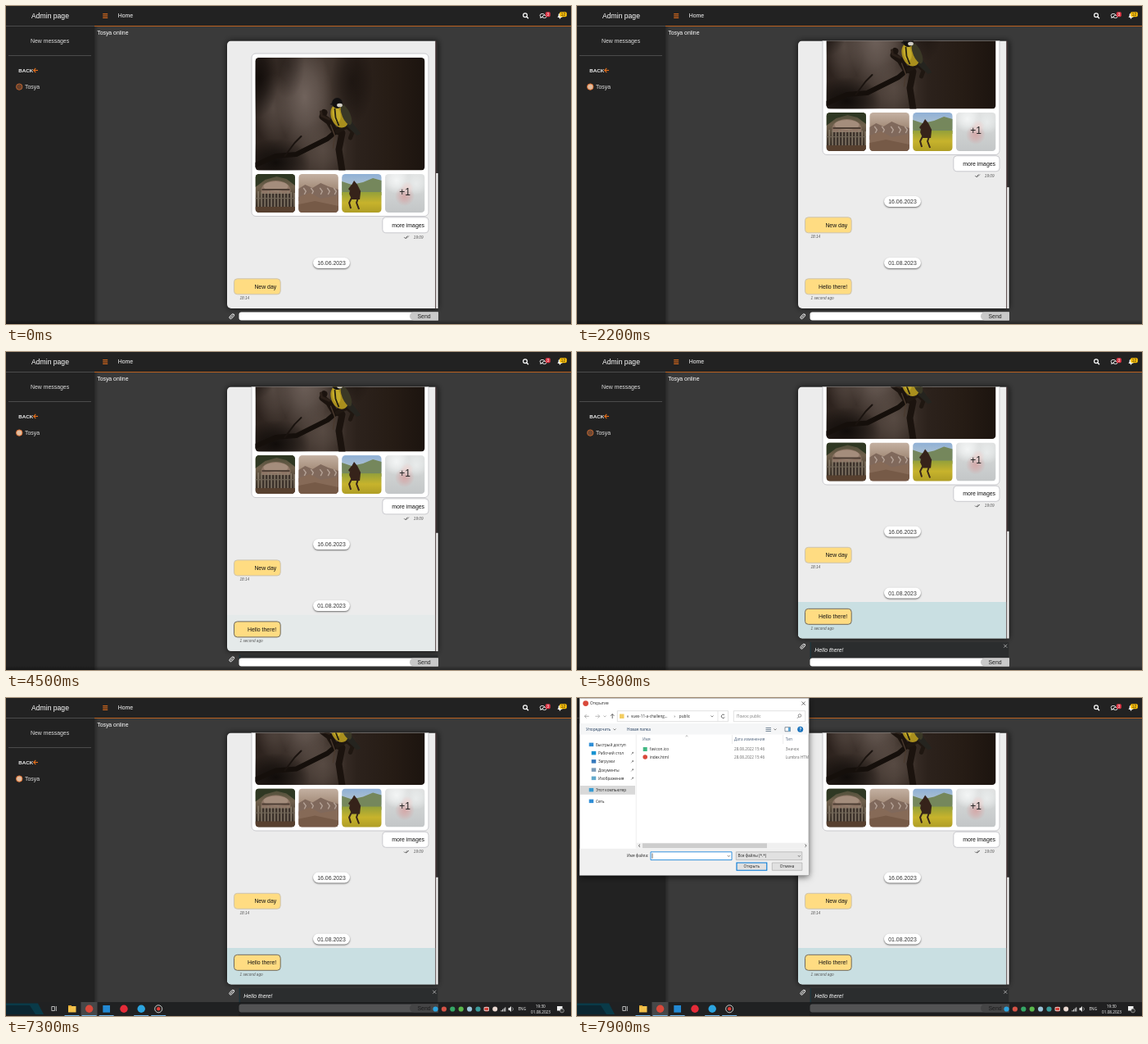
Animation, 690 px wide and 388 px high, one loop 8 s. Source, as an HTML page with a canvas:

```html
<!DOCTYPE html>
<html lang="en">
<head>
<meta charset="utf-8">
<title>Admin chat</title>
<style>
html, body { margin: 0; width: 100%; height: 100%; overflow: hidden; background: #3a3a3a; }
canvas { display: block; }
</style>
</head>
<body>
<canvas id="stage" width="690" height="388"></canvas>
<script>
const ctx = document.getElementById('stage').getContext('2d');
const LOOP = 8000;
const SANS = '"Liberation Sans", Arial, sans-serif';
const UI = '"Open Sans", "Noto Sans", sans-serif';
const USER = 'Tosya';
const ORANGE = '#e8701c';
const TOP = 42.5;
const ARRIVE = 1490;

const clamp = v => Math.max(0, Math.min(1, v));
const span = (t, a, b) => clamp((t - a) / (b - a));
const ease = p => p * p * (3 - 2 * p);

function rect(x, y, w, h, fill) {
  ctx.fillStyle = fill;
  ctx.fillRect(x, y, w, h);
}
function paint(fill, stroke, lw = 1) {
  if (fill) { ctx.fillStyle = fill; ctx.fill(); }
  if (stroke) { ctx.strokeStyle = stroke; ctx.lineWidth = lw; ctx.stroke(); }
}
function round(x, y, w, h, r, fill, stroke, lw) {
  ctx.beginPath();
  ctx.roundRect(x, y, w, h, r);
  paint(fill, stroke, lw);
}
function oval(x, y, rx, ry, fill, stroke, lw, turn = 0) {
  ctx.beginPath();
  ctx.ellipse(x, y, rx, ry, turn, 0, Math.PI * 2);
  paint(fill, stroke, lw);
}
const dot = (x, y, r, fill, stroke, lw) => oval(x, y, r, r, fill, stroke, lw);
function line(pts, stroke, lw = 1) {
  ctx.beginPath();
  for (let i = 0; i < pts.length; i += 2) ctx.lineTo(pts[i], pts[i + 1]);
  paint(null, stroke, lw);
}
function poly(pts, fill) {
  ctx.beginPath();
  for (let i = 0; i < pts.length; i += 2) ctx.lineTo(pts[i], pts[i + 1]);
  ctx.closePath();
  paint(fill);
}
function text(s, x, y, fill = '#fff', size = 6.9, align = 'left', style = '', family = SANS) {
  ctx.font = `${style} ${size}px ${family}`;
  ctx.textAlign = align;
  ctx.fillStyle = fill;
  ctx.fillText(s, x, y);
}
const ui = (s, x, y, fill = '#222', align = 'left') => text(s, x, y, fill, 4.7, align, '', UI);
function shade(x0, y0, x1, y1, ...colors) {
  const g = ctx.createLinearGradient(x0, y0, x1, y1);
  colors.forEach((c, i) => g.addColorStop(i / (colors.length - 1), c));
  return g;
}
function glow(x, y, r, rgb, alpha, sy = 1) {
  ctx.save();
  ctx.translate(x, y);
  ctx.scale(1, sy);
  const g = ctx.createRadialGradient(0, 0, 0, 0, 0, r);
  g.addColorStop(0, `rgba(${rgb},${alpha})`);
  g.addColorStop(.5, `rgba(${rgb},${alpha * .6})`);
  g.addColorStop(1, `rgba(${rgb},0)`);
  rect(-r, -r, 2 * r, 2 * r, g);
  ctx.restore();
}
function shadow(blur, color, draw, dy = 0) {
  ctx.save();
  ctx.shadowBlur = blur;
  ctx.shadowColor = color;
  ctx.shadowOffsetY = dy;
  draw();
  ctx.restore();
}
// Draws inside a rounded clip with its own origin
function photo(x, y, w, h, draw) {
  ctx.save();
  ctx.beginPath();
  ctx.roundRect(x, y, w, h, 4.5);
  ctx.clip();
  ctx.translate(x, y);
  draw(w, h);
  ctx.restore();
}

function bird(w, h) {
  rect(0, 0, w, h, shade(0, 0, w, 0, '#2b211c', '#3d322c', '#463a33', '#2c221c', '#261c15', '#1c140f'));
  glow(60, 48, 34, '128,114,107', .75, 1.9);
  glow(22, 62, 24, '104,91,84', .6, 1.8);
  glow(82, 112, 30, '104,90,82', .5);
  glow(4, 25, 24, '12,8,6', .8, 2);
  glow(118, 30, 26, '18,12,9', .6, 2);
  glow(25, 128, 42, '10,7,5', .85, .7);
  glow(40, 10, 20, '22,16,13', .4, 2);
  ctx.lineJoin = ctx.lineCap = 'round';
  line([0, 131, 25, 120, 50, 118, 72, 107, 88, 99, 101, 88], '#150f0b', 6);
  line([36, 120, 48, 104, 56, 96], '#1a130f', 2);
  line([84, 67, 82, 72, 90, 78, 96, 88, 106, 92, 102, 112, 106, 138], '#1b130e', 8);
  line([100, 90, 112, 84, 119, 90, 116, 98], '#1f1711', 5);
  line([80, 66, 81, 71, 90, 75], '#2b2019', 3);
  line([92, 82, 97, 95, 95, 110], '#4a3a2e', 1.3);
  ctx.lineJoin = ctx.lineCap = 'butt';
  poly([112, 68, 119, 80, 129, 93, 124, 95, 110, 82], '#25241f');
  oval(103, 71, 10.5, 15, '#a98f1d', null, 0, -.35);
  oval(99, 69, 5, 10, '#c3aa2a', null, 0, -.2);
  oval(111, 70, 5, 13, '#3a3826', null, 0, -.4);
  line([97, 62, 98, 73, 102, 83], '#25210f', 1.8);
  dot(100, 55.5, 6.5, '#121011');
  oval(103, 58, 3.4, 2.3, '#d3cfc6');
  poly([94, 55, 91, 57, 94, 58], '#1a1716');
}
function house(w, h) {
  rect(0, 0, w, h, shade(0, 0, 0, h, '#4c4c36', '#6f604c', '#4a3f33', '#2d251e'));
  poly([0, 0, w, 0, w, 14, 38, 6, 26, 3, 12, 7, 0, 16], '#2f3823');
  oval(25, 20, 18, 12, '#8d7565');
  oval(25, 15, 15, 6, '#a48d7c');
  rect(8, 18, 34, 2, '#4c3d33');
  rect(7, 24, 36, 16, '#3c322b');
  for (let x = 3; x < w; x += 4) rect(x, 21 + x % 3, 1.3, 19, '#8e8270');
  rect(0, 29, w, 1.2, '#6f6456');
  rect(0, 40, w, 8, '#57402f');
}
function mountain(w, h) {
  rect(0, 0, w, h, shade(0, 0, 0, h, '#c4b1a2', '#a8917f', '#7f6350', '#6d5141'));
  poly([0, 18, 8, 13, 17, 17, 27, 11, 36, 15, w, 19, w, 33, 0, 33], '#80695c');
  for (const x of [6, 15, 26, 35, 43]) line([x, 17, x + 3, 21, x + 1, 25], '#b3a195', 1.4);
  poly([0, 28, 14, 23, 27, 30, w, 26, w, h, 0, h], '#866a57');
  poly([0, 37, 20, 33, w, 39, w, h, 0, h], '#765a47');
}
function field(w, h) {
  rect(0, 0, w, 20, shade(0, 0, 0, 20, '#8fb0d6', '#b9c8cf'));
  poly([0, 9, 12, 13, 26, 10, 38, 5, w, 8, w, 26, 0, 26], '#75875c');
  rect(0, 22, w, 26, shade(0, 22, 0, 48, '#93a03a', '#c7b32c', '#ad9c25'));
  poly([11, 15, 15, 8, 19, 13, 23, 21, 22, 31, 12, 31, 9, 24], '#36231a');
  poly([12, 13, 8, 18, 9, 20, 15, 17], '#36231a');
  line([12, 29, 9, 35, 11, 42], '#36231a', 2);
  line([20, 29, 18, 35, 21, 43], '#36231a', 2);
}
function pale(w, h) {
  rect(0, 0, w, h, shade(0, 0, 0, h, '#dfe1e1', '#cfd2d2', '#c3c6c7'));
  glow(14, 8, 16, '246,248,248', .9);
  glow(38, 12, 14, '240,243,243', .7);
  glow(24, 27, 12, '214,160,160', .8);
  glow(27, 17, 8, '238,214,212', .9);
  text('+1', 24.3, 25.7, '#222', 12, 'center');
}

function pill(s, y) {
  shadow(2, 'rgba(0,0,0,.55)', () => round(375, y - 6.5, 45, 13, 6.5, '#fff'), 1);
  text(s, 397.5, y + 2.5, '#333', 6.9, 'center');
}
function bubble(x, y, w, s, fill, edge) {
  round(x, y, w, 19, 4, fill, edge, 1);
  text(s, x + w - 5, y + 11.8, '#111', 6.9, 'right');
}
const stamp = (s, x, y) => text(s, x, y, '#555', 4.7, 'left', 'italic');

function messages(reply, hover, arrived) {
  round(300, 58, 216, 198.5, 5, '#fff', '#c9c9cd');
  photo(304.5, 63, 207, 137.5, bird);
  [house, mountain, field, pale].forEach((draw, i) => photo(304.5 + 52.8 * i, 205, 48.6, 47, draw));
  bubble(459.8, 257.8, 56.2, 'more images', '#fff', '#c9c9cd');
  line([486, 282, 487.5, 283.5, 490.5, 280.5], '#555', .8);
  line([488, 283, 489, 283.5, 492, 280.5], '#555', .8);
  stamp('19:09', 497.8, 283.5);
  pill('16.06.2023', 313.5);
  bubble(278.5, 332.8, 56.7, 'New day', '#ffdc82', '#cdc3ae');
  stamp('18:14', 285.5, 358.2);
  if (!arrived) return;
  pill('01.08.2023', 388.5);
  if (reply) {
    ctx.globalAlpha = reply;
    rect(270, 399.5, 255, 46, '#c9dfe2');
    ctx.globalAlpha = 1;
  }
  bubble(278.5, 407.8, 56.7, 'Hello there!', '#ffdc82', reply || hover ? '#6f6a60' : '#cdc3ae');
  stamp('1 second ago', 285.5, 433.2);
}

function clip(x, y) {
  ctx.save();
  ctx.translate(x, y);
  ctx.rotate(.75);
  ctx.lineCap = 'round';
  round(-1.6, -3.4, 3.2, 6.8, 1.6, null, '#fff', .9);
  line([0, -1.4, 0, 1.8], '#fff', .9);
  ctx.restore();
}

function chat(t) {
  const arrived = t > ARRIVE;
  const reply = ease(span(t, 4300, 5000));
  const panel = 19.5 * reply;
  const scroll = 75 * ease(span(t, ARRIVE, 2150)) + panel;
  const bottom = 369 - panel;
  const view = bottom - TOP;
  const content = arrived ? 721 : 646;
  const thumb = view * view / content;
  const thumbY = TOP + (319.5 + scroll) / content * view;

  shadow(7, 'rgba(0,0,0,.75)', () => round(270, TOP, 257.5, view, [5, 2, 2, 5], '#303030'));
  ctx.save();
  ctx.beginPath();
  ctx.roundRect(270, TOP, 254.5, view, [5, 0, 0, 5]);
  ctx.clip();
  rect(270, TOP, 255, view, '#ececec');
  ctx.translate(0, -scroll);
  messages(reply, t >= 3200 && t < 3600, arrived);
  ctx.restore();
  rect(524.5, TOP, 1, view, '#4a3033');
  rect(525.3, thumbY, 2.2, Math.min(thumb, bottom - thumbY), '#fff');

  if (panel) {
    ctx.save();
    ctx.beginPath();
    ctx.rect(284.5, 373.5 - panel, 243, panel);
    ctx.clip();
    rect(284.5, 354, 243, 20, '#2b2d2e');
    rect(284.5, 354, 1.2, 20, '#1b3a42');
    text('Hello there!', 290.3, 365.5, '#fff', 6.9, 'left', 'italic');
    line([521.2, 356.7, 525.2, 360.7], '#bbb', .8);
    line([525.2, 356.7, 521.2, 360.7], '#bbb', .8);
    ctx.restore();
  }
  clip(275.7, 378.7 - panel);
  round(284.5, 373.5, 243.3, 10, [3, 0, 0, 3], '#fff');
  round(493, 373.5, 34.8, 10, [5, 0, 0, 5], '#c9c9c9');
  text('Send', 502.5, 381.2, '#222');

  if (t >= 3600 && t < 4300) {
    const fill = t >= 4100 ? '#dcdcdc' : '#efefef';
    shadow(3, 'rgba(0,0,0,.5)', () => round(322.5, 288.5, 31, 14.5, 1.5, fill), .5);
    text('Reply', 338, 298, '#222', 6.9, 'center');
  }
}

function attach(t) {
  if (t < 5850 || t >= 7300) return;
  const p = ease(span(t, 5850, 6200));
  rect(108, 25, 582, 363, `rgba(0,0,0,${.71 * p})`);
  ctx.save();
  ctx.globalAlpha = p;
  if (t >= 6600 && t < 6800) round(268.8, 309.8, 64.5, 16, 8, 'rgba(0,0,0,.5)', '#ccc', .8);
  if (t >= 6850) round(268.8, 332, 54.2, 16, 8, 'rgba(20,20,20,.6)', '#ccc', .8);
  round(273, 311.7, 14, 12, 1.5, '#fff');
  dot(276.5, 315, 1.5, '#222');
  poly([274.5, 322, 278, 318, 279.5, 319.5, 282.5, 315.5, 285.7, 319.5, 285.7, 322], '#222');
  text('attach image', 288.8, 320);
  poly([273.3, 333, 279.7, 333, 283.5, 336.8, 283.5, 346.5, 273.3, 346.5], '#fff');
  line([279.7, 333, 279.7, 336.8, 283.5, 336.8], '#555', .7);
  text('attach file', 288.8, 342);
  ctx.restore();
}

function avatar(t) {
  const dark = Math.max(0, Math.cos(t / 2850 * Math.PI * 2)) ** 2;
  const mix = (a, b) => Math.round(a + (b - a) * dark);
  dot(16.2, 98.6, 3.7, `rgb(${mix(226, 105)},${mix(190, 66)},${mix(160, 44)})`, `rgb(${mix(225, 185)},${mix(112, 98)},${mix(50, 48)})`, 1);
}

function frame() {
  rect(0, 0, 108, 388, '#222');
  rect(0, 24, 108, .8, '#555');
  rect(3, 60, 101, .8, '#555');
  text('Admin page', 54, 15.2, '#fff', 8.6, 'center');
  text('New messages', 53.6, 44.5, '#ddd', 6.9, 'center');
  text('BACK', 15.3, 80.8, '#eee', 6.2, 'left', 'bold');
  line([39, 78.5, 33.8, 78.5], ORANGE, 1.1);
  line([36.3, 75.9, 33.7, 78.5, 36.3, 81.1], ORANGE, 1.1);
  text(USER, 23, 101.2, '#ddd');
  rect(108, 0, 582, 24, '#222');
  rect(108, 24, 582, 1, '#b9601f');
  for (let i = 0; i < 3; i++) rect(118.2, 9.2 + 2.3 * i, 6, 1.1, ORANGE);
  text('Home', 136.8, 14.2);
  dot(634, 11.3, 2.4, null, '#fff', 1.2);
  line([635.6, 13, 638, 15.3], '#fff', 1.4);
  oval(655, 11.6, 2.9, 2.2, '#222', '#fff', .8);
  poly([653, 13, 652, 15, 655, 14], '#fff');
  oval(657.6, 13, 2.3, 1.7, '#222', '#fff', .8);
  round(658.8, 7.2, 6, 6, 1.6, '#dc3545');
  text('3', 661.8, 11.9, '#fff', 4.6, 'center');
  poly([673.4, 14, 674.5, 12.5, 674.8, 9.8, 676.5, 8.7, 678.2, 9.8, 678.5, 12.5, 679.6, 14], '#fff');
  dot(676.5, 14.7, .9, '#fff');
  round(676, 7.2, 8.8, 6, 1.6, '#ffc107');
  text('12', 680.4, 11.9, '#222', 4.6, 'center');
}

function taskbar() {
  rect(0, 371, 690, 17, 'rgba(24,24,25,.74)');
  rect(0, 371, 284, 17, '#202122');
  poly([0, 372.5, 39, 372.5, 46, 386, 0, 386], '#093a48');
  poly([0, 375, 29, 375, 36, 386, 0, 386], '#0b2631');
  rect(91.5, 371, 20, 17, '#464748');
  round(55.8, 376.5, 3.6, 5, 0, null, '#ddd', .8);
  line([61.3, 376, 61.3, 382], '#ddd', .8);
  rect(76, 376, 9.5, 7.5, '#f2c14b');
  rect(76, 375, 4, 1.5, '#d99f2b');
  dot(101.6, 379.3, 4.7, '#d9493b');
  rect(118.3, 375, 8.7, 8.7, '#2389d3');
  dot(144, 379.3, 4.7, '#e52b38');
  dot(165.2, 379.3, 4.7, '#2ca4df');
  dot(186.2, 379.3, 4.5, '#222', '#ddd', .9);
  dot(186.2, 379.3, 2.2, '#e43b36');
  for (const x of [80.5, 101.6, 122.6, 165.2, 186.2]) rect(x - 9, 387, 18, 1, '#76b9ed');
  const tray = ['#2ca4df', '#d55346', '#35a765', '#5ab74c', '#9bc3d8', '#3b9b9b', '#d53f37'];
  tray.forEach((c, i) => dot(524.5 + 10.4 * i, 379.5, 3.1, c));
  round(584, 377.5, 5.5, 4, 0, null, '#ddd', .8);
  dot(597.2, 379.5, 3, '#e9d7d0');
  for (let i = 0; i < 4; i++) rect(604.5 + 1.6 * i, 381 - 1.2 * i, 1, 1.5 + 1.2 * i, '#ddd');
  poly([613.5, 378, 615, 378, 617, 376, 617, 383, 615, 381, 613.5, 381], '#ddd');
  line([618.5, 377.5, 619.4, 379.5, 618.5, 381.5], '#ddd', .6);
  ui('ENG', 625.5, 381.3, '#fff');
  ui('19:30', 652.8, 377.5, '#fff', 'center');
  ui('01.08.2023', 653, 385.3, '#fff', 'center');
  round(673, 376, 6.5, 5.5, 0, '#eee');
  dot(679, 381.5, 2.4, '#333', '#ddd', .5);
}

const chevron = (x, y, c = '#555') => line([x - 1.5, y - .8, x, y + .8, x + 1.5, y - .8], c, .7);
function arrow(x, y, turn, color) {
  ctx.save();
  ctx.translate(x, y);
  ctx.rotate(turn);
  line([2.7, 0, -2.7, 0], color, .8);
  line([-.5, -2.2, -2.7, 0, -.5, 2.2], color, .8);
  ctx.restore();
}
function box(x, y, w, h, fill, edge, lw = .7) {
  round(x, y, w, h, 0, fill, edge, lw);
}

function dialog() {
  shadow(8, 'rgba(0,0,0,.65)', () => rect(3, 0, 280.3, 216.5, '#fff'), 1);
  box(3.3, .3, 279.8, 216, null, '#777', .6);
  dot(10.6, 6.6, 3.4, '#d9493b');
  ui('Открытие', 16, 8.4);
  line([274.5, 4.5, 278.7, 8.7], '#333', .7);
  line([278.7, 4.5, 274.5, 8.7], '#333', .7);

  arrow(12, 22.3, 0, '#999');
  arrow(25, 22.3, Math.PI, '#aaa');
  chevron(34, 22.3, '#999');
  arrow(43.2, 22.3, Math.PI / 2, '#444');
  box(49.3, 15.7, 135.3, 13, '#fff', '#d5d5d5');
  line([172, 16, 172, 28.5], '#ddd', .7);
  rect(52, 19.5, 5.5, 5.5, '#f3cd62');
  ui('«', 60.7, 24);
  ui('vuex-11-a-challeng...', 66, 24);
  ui('›', 118.5, 24);
  ui('public', 124.8, 24);
  chevron(165, 22.3);
  ctx.beginPath();
  ctx.arc(178.5, 22.3, 2.2, .5, 5.6);
  paint(null, '#444', .8);
  box(191.3, 15.7, 87.5, 13, '#fff', '#d5d5d5');
  ui('Поиск: public', 195, 24, '#777');
  dot(272, 21.5, 1.8, null, '#666', .7);
  line([270.7, 23, 269, 24.7], '#666', .8);

  rect(3.6, 31, 279.4, 13.5, '#f5f6f7');
  ui('Упорядочить', 11, 39.8, '#1e395b');
  chevron(46, 38.3);
  ui('Новая папка', 61, 39.8, '#1e395b');
  for (let i = 0; i < 3; i++) rect(230.5, 36 + 2 * i, 6.5, 1, '#789');
  chevron(242, 38.3);
  box(254, 35.7, 6.5, 5, '#fff', '#567');
  rect(258, 36, 2.4, 4.5, '#58a5d7');
  dot(272.7, 38.2, 3.5, '#1872bd');
  text('?', 272.7, 40.1, '#fff', 5, 'center', 'bold');

  rect(4, 107, 67, 10.8, '#d9d9d9');
  const places = [
    ['Быстрый доступ', 57, 23, '#2f8ed6'], ['Рабочий стол', 67.3, 26, '#1793d1'],
    ['Загрузки', 77.5, 26, '#3579bd'], ['Документы', 87.8, 26, '#7c9cb8'],
    ['Изображения', 98, 26, '#62a9cc'], ['Этот компьютер', 112.3, 23, '#379bd2'],
    ['Сеть', 126, 23, '#2f8ed6']
  ];
  places.forEach(([s, y, x, c], i) => {
    rect(x - 8.3, y - 2.4, 5.5, 4.5, c);
    ui(s, x, y + 1.7);
    if (i > 0 && i < 5) {
      line([66, y + 1.8, 68, y - .3], '#777', .6);
      dot(68.2, y - .5, 1, '#888');
    }
  });
  rect(71.8, 44.5, .7, 139, '#e5e5e5');

  line([132.6, 47, 134, 45.7, 135.4, 47], '#777', .6);
  ui('Имя', 80, 52, '#4c607a');
  ui('Дата изменения', 192, 52, '#4c607a');
  ui('Тип', 254.7, 52, '#4c607a');
  for (const x of [189.3, 251.5]) rect(x, 45, .6, 11, '#e1e1e1');
  ctx.save();
  ctx.beginPath();
  ctx.rect(72, 56, 210.8, 24);
  ctx.clip();
  rect(80.7, 60, 5, 5, '#41b883');
  dot(83.2, 72, 2.8, '#d9493b');
  [['favicon.ico', 'Значок'], ['index.html', 'Lumbra HTML Document']].forEach(([name, kind], i) => {
    const y = 64.3 + 9.6 * i;
    ui(name, 88.8, y);
    ui('28.08.2022 15:46', 192, y, '#666');
    ui(kind, 254.7, y, '#666');
  });
  ctx.restore();

  rect(72.5, 176.7, 210.3, 7, '#f0f0f0');
  rect(80, 177.3, 152, 5.8, '#cdcdcd');
  line([77, 178.6, 75.3, 180.2, 77, 181.8], '#444', .8);
  line([278.5, 178.6, 280.2, 180.2, 278.5, 181.8], '#444', .8);
  rect(3.6, 183.8, 279.2, 32.3, '#f0f0f0');
  ui('Имя файла:', 87.3, 194.3, '#222', 'right');
  box(90, 187.8, 99, 9.8, '#fff', '#0078d7', .8);
  rect(91.7, 189.5, .6, 6.3, '#111');
  chevron(185.3, 192.8);
  box(194.3, 187.8, 80.5, 9.8, '#e1e1e1', '#adadad');
  ui('Все файлы (*.*)', 196.5, 194.3);
  chevron(271.3, 192.8);
  box(195, 201, 36.8, 9.3, '#e1e1e1', '#0078d7', 1.1);
  ui('Открыть', 213.4, 207.3, '#222', 'center');
  box(238.3, 201, 36.6, 9.3, '#e1e1e1', '#adadad');
  ui('Отмена', 256.6, 207.3, '#222', 'center');
}

function render(t) {
  rect(0, 0, 690, 388, '#3a3a3a');
  rect(108, 25, 5, 363, shade(108, 0, 113, 0, 'rgba(0,0,0,.3)', 'rgba(0,0,0,0)'));
  text(USER + ' online', 111.2, 35.3);
  chat(t);
  attach(t);
  frame();
  avatar(t);
  rect(0, 383, 690, 5, shade(0, 383, 0, 388, 'rgba(0,0,0,0)', 'rgba(0,0,0,.35)'));
  if (t >= 7300) taskbar();
  if (t >= 7600) {
    ctx.globalAlpha = span(t, 7500, 7750);
    dialog();
    ctx.globalAlpha = 1;
  }
}

function tick() {
  render(performance.now() % LOOP);
  requestAnimationFrame(tick);
}
tick();
</script>
</body>
</html>
```
